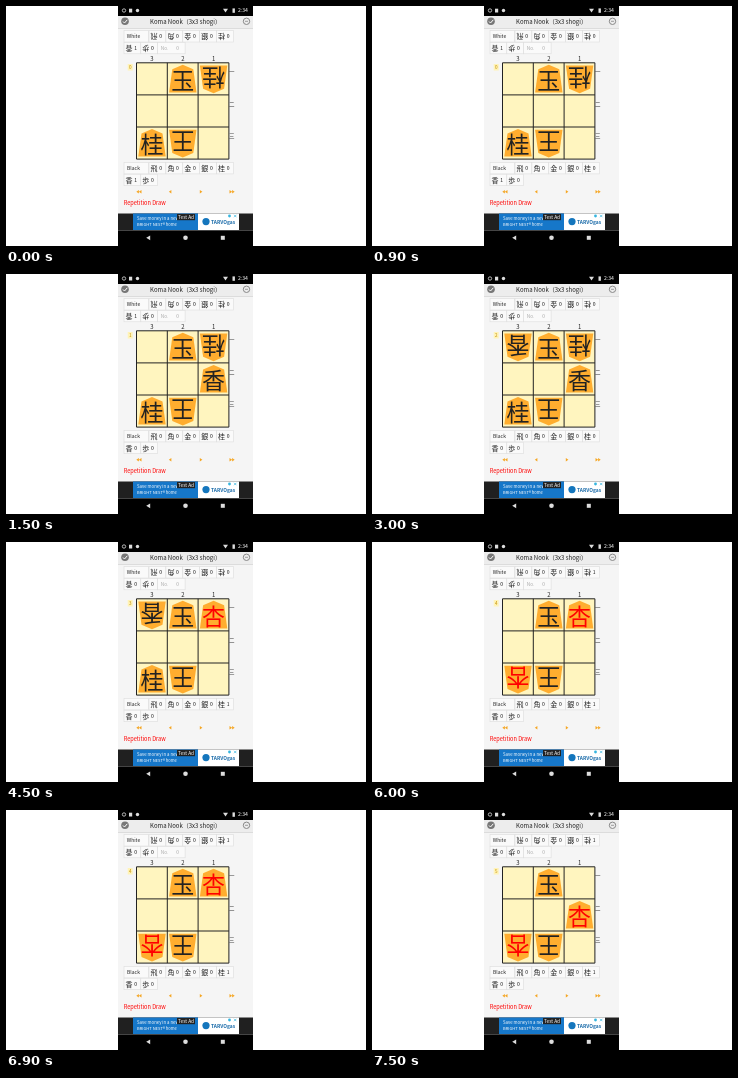
Write an HTML page with a canvas that moves like this. It is 360 px wide and 240 px high and loops after 8 s.

```html
<!DOCTYPE html>
<html lang="ja">
<head>
<meta charset="utf-8">
<style>
html, body { margin: 0; width: 100%; height: 100%; overflow: hidden; background: #fff; }
canvas { display: block; width: 360px; height: 240px; }
</style>
</head>
<body>
<canvas></canvas>
<script>
const canvas = document.querySelector('canvas');
const ctx = canvas.getContext('2d');
const ratio = window.devicePixelRatio || 1;
canvas.width = 360 * ratio;
canvas.height = 240 * ratio;
ctx.scale(ratio, ratio);

const LOOP = 8000, STEP = 1500;
const SANS = '"Noto Sans CJK JP", "Noto Sans CJK", sans-serif';
const INK = '#222', RED = '#f00', ORANGE = '#f5a623';

// Each entry: kanji, file, rank, side (upper case W points down), optional promotion.
const kings = ['玉21B', '王23W'];
const boards = [
  ['桂11W', '桂33B'],
  ['桂11W', '桂33B', '香12B'],
  ['桂11W', '桂33B', '香12B', '香31W'],
  ['杏11B+', '桂33B', '香31W'],
  ['杏11B+', '杏33W+'],
  ['杏12B+', '杏33W+']
].map(pieces => kings.concat(pieces));

function rect(x, y, w, h, fill) {
  ctx.fillStyle = fill;
  ctx.fillRect(x, y, w, h);
}

function polygon(points, fill) {
  ctx.beginPath();
  points.forEach(([x, y]) => ctx.lineTo(x, y));
  ctx.closePath();
  ctx.fillStyle = fill;
  ctx.fill();
}

function circle(x, y, r, fill) {
  ctx.beginPath();
  ctx.arc(x, y, r, 0, Math.PI * 2);
  ctx.fillStyle = fill;
  ctx.fill();
}

function line(points, color, width = 1) {
  ctx.beginPath();
  points.forEach(([x, y]) => ctx.lineTo(x, y));
  ctx.strokeStyle = color;
  ctx.lineWidth = width;
  ctx.stroke();
}

// Text centred vertically on y.
function text(str, x, y, size, color = INK, align = 'center', weight = 400) {
  ctx.font = `${weight} ${size}px ${SANS}`;
  ctx.textAlign = align;
  ctx.fillStyle = color;
  ctx.fillText(str, x, y + size * 0.37);
}

function turned(x, y, flip, paint) {
  ctx.save();
  ctx.translate(x, y);
  if (flip) ctx.rotate(Math.PI);
  paint();
  ctx.restore();
}

function cell(x, y, w, h = 11.5) {
  rect(x, y, w, h, '#fafafa');
  ctx.strokeStyle = '#ddd';
  ctx.lineWidth = 0.6;
  ctx.strokeRect(x, y, w, h);
}

function statusBar() {
  rect(112, 0, 135, 10, '#000');
  ctx.strokeStyle = '#ddd';
  ctx.lineWidth = 0.8;
  ctx.beginPath();
  ctx.arc(118, 4.5, 1.7, 0, 7);
  ctx.stroke();
  rect(123, 2.7, 3.2, 3.8, '#ddd');
  circle(131.5, 4.5, 1.7, '#ddd');
  polygon([[217, 2.8], [222, 2.8], [219.5, 6.6]], '#ddd');
  rect(226.5, 2.4, 2.4, 4.4, '#ddd');
  text('2:34', 242, 4.5, 5.2, '#fff', 'right');
}

function titleBar() {
  rect(112, 10, 135, 12, '#ededed');
  rect(112, 22, 135, 0.6, '#ccc');
  text('Koma Nook（3x3 shogi）', 179.5, 15.7, 6);
  circle(119, 15.3, 3.8, '#777');
  line([[117, 15.5], [118.5, 17], [121.3, 13.8]], '#fff', 1);
  ctx.beginPath();
  ctx.arc(240.5, 15.3, 3.2, 0, 7);
  ctx.strokeStyle = '#888';
  ctx.lineWidth = 1;
  ctx.stroke();
  line([[239, 15.3], [242, 15.3]], '#888', 0.8);
}

function hand(name, y, flip, lance, knight) {
  cell(118, y - 5.8, 24.5);
  text(name, 127.5, y, 5, INK, 'center', 500);
  const held = (kanji, x, row, count) => {
    cell(x - 5, row - 5.8, 16.8);
    turned(x, row, flip, () => text(kanji, 0, 0, 7));
    text(count, x + 6.6, row, 5, INK, 'center', 500);
  };
  [...'飛角金銀桂'].forEach((kanji, i) =>
    held(kanji, 148 + i * 16.9, y, kanji === '桂' ? knight : 0));
  held('香', 123, y + 11.8, lance);
  held('歩', 139.8, y + 11.8, 0);
}

function piece(code) {
  const [kanji, file, rank, side, promoted] = code;
  const x = 146 + (3 - file) * 30.8;
  const y = 73 + (rank - 1) * 32.1;
  turned(x, y, side === 'W', () => {
    polygon([[0, -14.2], [10.5, -9.7], [13.7, 13.4], [-13.7, 13.4], [-10.5, -9.7]], '#ffad2f');
    text(kanji, 0, 1.4, 23, promoted ? RED : INK);
  });
}

function board(step) {
  const left = 130.5, top = 56.8, w = 30.8, h = 32.1;
  rect(left, top, w * 3, h * 3, '#fff5bf');
  boards[step].forEach(piece);
  for (let i = 0; i < 4; i++) {
    line([[left + i * w, top], [left + i * w, top + 3 * h]], '#222', 1);
    line([[left, top + i * h], [left + 3 * w, top + i * h]], '#222', 1);
  }
  for (let i = 0; i < 3; i++) {
    text(3 - i, 146 + i * w, 53.2, 6);
    text('一二三'[i], 225.7, 65.5 + i * h, 5.5);
  }
  rect(121.7, 58, 5, 6.5, '#fff3b8');
  text(step, 124.2, 61.3, 4.6, '#c49000', 'center', 500);
}

function controls() {
  const arrow = (x, dir) =>
    polygon([[x + dir * 1.4, 185.7], [x - dir * 1.2, 184], [x - dir * 1.2, 187.4]], ORANGE);
  arrow(131.7, -1);
  arrow(134.3, -1);
  arrow(164.2, -1);
  arrow(195, 1);
  arrow(224.7, 1);
  arrow(227.3, 1);
  text('Repetition Draw', 117.7, 197.4, 5.6, RED, 'left');
}

function advert() {
  rect(112, 207.5, 135, 17, '#202020');
  rect(127, 207.5, 65, 16.5, '#1677c9');
  rect(192, 207.5, 41, 16.5, '#fff');
  text('Save money in a new', 131, 212.7, 4.3, '#fff', 'left');
  text('BRIGHT NEST® home', 131, 218.7, 4.1, '#fff', 'left');
  rect(171, 208, 18, 6.2, '#222');
  text('Test Ad', 180, 211, 4.8, '#fff');
  circle(200, 215.6, 3.6, '#1476bd');
  text('TARVOgas', 205, 215.7, 4.9, '#1769a8', 'left', 700);
  circle(223.5, 210, 1.4, '#35b5df');
  line([[228, 208.8], [230.4, 211.2]], '#35b5df', 0.7);
  line([[230.4, 208.8], [228, 211.2]], '#35b5df', 0.7);
}

function navBar() {
  rect(112, 224.5, 135, 15.5, '#000');
  polygon([[140.2, 231.8], [144.2, 229.4], [144.2, 234.2]], '#ddd');
  circle(179.5, 231.8, 2.3, '#ddd');
  rect(214.8, 229.8, 4, 4, '#ddd');
}

function draw(now) {
  const step = Math.floor((now % LOOP) / STEP);
  rect(0, 0, 360, 240, '#fff');
  rect(112, 0, 135, 240, '#f5f5f5');
  statusBar();
  titleBar();
  hand('White', 30.3, true, step < 2 ? 1 : 0, step < 4 ? 0 : 1);
  cell(151.6, 36.3, 27.5);
  text('No.', 158.5, 42.1, 4.8, '#aaa');
  text('0', 171.5, 42.1, 4.8, '#aaa');
  hand('Black', 162.2, false, step < 1 ? 1 : 0, step < 3 ? 0 : 1);
  board(step);
  controls();
  advert();
  navBar();
}

const start = performance.now();
function tick() {
  draw(performance.now() - start);
  requestAnimationFrame(tick);
}
draw(0);
requestAnimationFrame(tick);
</script>
</body>
</html>
```
